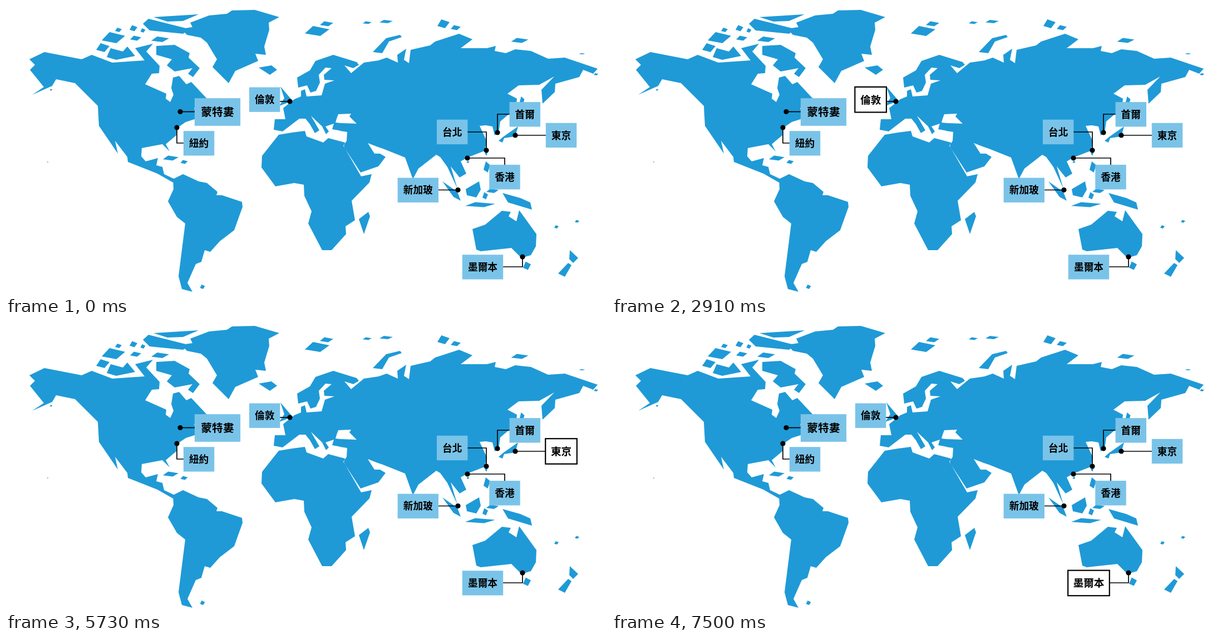
These frames come from a looping animation (1078x519 px, 8000 ms). An HTML page with a canvas:

```html
<!DOCTYPE html>
<html lang="zh-Hant">
<head>
<meta charset="utf-8">
<style>
html, body { margin: 0; width: 100%; height: 100%; overflow: hidden; background: #fff; }
canvas { display: block; }
</style>
</head>
<body>
<canvas id="stage" width="1078" height="519"></canvas>
<script>
const W = 1078, H = 519;
const LOOP = 8000, STEP = 1145;
const ctx = document.getElementById('stage').getContext('2d');

const toPath = pts => new Path2D('M' + pts.replace(/ /g, 'L'));
const land = new Path2D();
const coast = pts => land.addPath(toPath(pts + 'Z'));

// Small island: a skewed four-sided chip filling the given box.
function isle(x, y, w, h) {
  land.moveTo(x - w / 2, y + h / 4);
  land.lineTo(x - w / 6, y - h / 2);
  land.lineTo(x + w / 2, y - h / 6);
  land.lineTo(x + w / 8, y + h / 2);
  land.closePath();
}

function americas() {
  coast('42,96 69,83 136,96 154,88 191,102 249,98 232,76 264,68 252,82 276,108 275,121 262,122 250,141 288,158 287,167 295,173 301,160 297,148 300,129 311,126 324,141 333,137 361,167 338,184 345,202 323,209 307,220 306,233 287,249 294,262 281,249 244,256 243,271 251,280 273,274 270,287 281,290 284,303 303,312 300,318 272,302 219,281 218,272 196,243 201,266 167,216 165,180 124,139 90,132 83,144 47,160 68,146 43,115 52,106');
  coast('300,312 318,303 346,316 361,319 380,335 378,341 388,341 424,353 425,362 410,404 384,424 367,443 357,440 351,461 341,465 326,499 335,515 316,510 310,487 322,392 307,380 291,352 301,330');
  isle(296, 274, 28, 9);
  isle(320, 281, 13, 7);
  isle(353, 506, 9, 8);
  isle(81, 151, 5, 3);
  isle(75, 281, 2, 2);
}

function arctic() {
  coast('315,41 335,38 331,30 365,17 397,14 406,8 447,7 491,20 472,30 473,43 464,73 467,88 448,86 453,99 412,117 400,139 371,110 379,96 361,66 350,57 325,52');
  coast('454,111 477,107 487,115 474,124');
  coast('270,72 303,70 330,85 328,93 348,112 336,128 327,122 335,112 303,118 289,107 298,96 270,88');
  coast('181,92 188,76 210,82 218,73 232,90 198,97');
  coast('265,20 346,15 318,27 290,28');
  coast('246,32 256,23 331,42 318,50 258,44');
  isle(174, 75, 24, 16);
  isle(193, 57, 42, 20);
  isle(202, 43, 12, 8);
  isle(229, 40, 14, 11);
  isle(233, 58, 20, 9);
  isle(277, 60, 32, 10);
  isle(246, 44, 9, 8);
}

function africa() {
  coast('490,232 460,270 459,291 484,325 518,319 535,322 536,342 549,370 543,392 568,440 585,440 611,411 610,397 627,386 621,351 653,318 657,303 638,307 607,253 609,246 579,238 570,246 540,235 537,225 514,228');
  coast('634,384 651,371 654,379 643,411');
}

function europe() {
  coast('523,129 546,116 556,99 588,88 630,101 634,106 624,112 608,107 620,121 643,102 670,98 670,200 628,211 613,227 586,222 589,212 574,217 580,226 575,231 568,217 548,198 563,224 555,229 546,213 538,203 527,203 497,226 481,223 483,204 502,204 498,184 518,168 530,163 530,153 537,150 540,163 567,161 573,140 590,134 572,133 571,124 585,112 574,111 562,124 564,138 557,153 547,156 541,143 525,147');
  coast('493,145 515,171 491,180 500,166');
  isle(559, 45, 44, 18);
  isle(576, 32, 24, 9);
}

function asia() {
  coast('655,103 684,93 704,102 703,88 719,77 715,97 724,103 727,79 762,71 771,64 814,50 838,60 817,76 864,76 880,72 878,81 898,85 915,78 943,81 974,95 1004,93 1063,113 1055,122 1037,115 1030,128 987,140 986,155 964,176 962,151 985,127 958,142 921,143 901,158 918,167 915,195 655,195');
  coast('640,185 915,185 888,208 885,229 878,233 874,217 862,215 851,216 864,244 860,261 829,273 817,280 827,302 815,309 799,289 811,329 793,290 780,272 773,268 741,293 731,312 717,273 677,257 668,254 650,247 662,266 672,266 682,272 669,289 637,300 606,252 612,243 613,227 600,225');
  coast('659,83 683,58 708,52 711,56 688,64 676,85');
  coast('885,243 893,236 920,217 915,235 895,238 892,246');
  isle(649, 30, 16, 5);
  isle(683, 28, 24, 6);
  isle(786, 32, 22, 16);
  isle(808, 39, 18, 9);
  isle(923, 62, 31, 9);
  isle(1035, 86, 11, 2);
  isle(1060, 123, 8, 4);
  isle(927, 171, 9, 16);
  isle(863, 264, 5, 11);
  isle(830, 281, 5, 4);
}

function oceania() {
  coast('784,316 811,335 817,351 804,344');
  coast('826,330 850,316 853,331 845,345 828,341');
  coast('892,337 924,346 942,354 945,367 902,354');
  coast('838,402 861,394 891,369 907,371 903,379 917,388 922,368 953,411 952,433 943,449 926,454 908,436 853,442 845,439');
  coast('1013,440 1028,454 1019,463 1012,456');
  coast('1010,463 1016,467 1004,488 992,482');
  isle(852, 358, 54, 9);
  isle(861, 342, 10, 13);
  isle(864, 290, 12, 20);
  isle(874, 333, 22, 8);
  isle(936, 468, 14, 15);
  isle(989, 398, 8, 6);
  isle(1026, 388, 8, 5);
}

[americas, arctic, africa, europe, asia, oceania].forEach(build => build());
const blackSea = toPath('594,203 597,195 620,194 617,199 630,212 602,211 592,210');

// Connectors run from the dot to the label.
const cities = [
  { name: '蒙特婁', x: 380, y: 191, zoom: 1.12, line: '313,190.5 340,190.5' },
  { name: '紐約', x: 346.6, y: 247.4, line: '307,219 307,247 320,247' },
  { name: '倫敦', x: 464.7, y: 168.7, line: '510,172 491,172' },
  { name: '首爾', x: 932.3, y: 195.3, line: '883,228 883,195 906,195' },
  { name: '東京', x: 997.5, y: 233, line: '915,233 971,233' },
  { name: '台北', x: 801.7, y: 227, line: '863,260 863,227 828,227' },
  { name: '墨爾本', x: 856.5, y: 470.4, line: '928,452 928,470 892,470' },
  { name: '香港', x: 896, y: 308.3, line: '829,274 896,274 896,288' },
  { name: '新加玻', x: 740.3, y: 331.8, line: '812,331.5 775,331.5' }
];
for (const c of cities) {
  c.path = toPath(c.line);
  c.dot = c.line.split(' ')[0].split(',').map(Number);
}

const ease = (t, from, to) => {
  const k = Math.min(1, Math.max(0, (t - from) / (to - from)));
  return (1 - Math.cos(Math.PI * k)) / 2;
};
const mix = (a, b, k) => a + (b - a) * k;

// 0 = resting label, 1 = highlighted label; cities take turns in list order.
function highlight(turn, t) {
  const local = t - turn * STEP;
  return ease(local, 170, 630) * (1 - ease(local, STEP, STEP + 450));
}

function drawLabel({ name, x, y, zoom = 1 }, k) {
  const w = (name.length === 3 ? 73.4 : 55.4) * zoom + 1.2 * k;
  const h = 44.4 * zoom + 1.2 * k;
  ctx.save();
  ctx.translate(x, y);
  ctx.fillStyle = `rgb(${mix(122, 255, k)}, ${mix(195, 255, k)}, ${mix(232, 255, k)})`;
  ctx.fillRect(-w / 2, -h / 2, w, h);
  if (k > 0) {
    ctx.strokeStyle = `rgba(0, 0, 0, ${k})`;
    ctx.lineWidth = 2.2;
    ctx.strokeRect(-w / 2, -h / 2, w, h);
  }
  const size = zoom * mix(1, 1.05, k);
  ctx.scale(size, size);
  ctx.fillStyle = '#000';
  ctx.fillText(name, 0, 6.6);
  ctx.restore();
}

function draw(t) {
  ctx.fillStyle = '#fff';
  ctx.fillRect(0, 0, W, H);
  ctx.fillStyle = '#1f9ad7';
  ctx.fill(land);
  ctx.fillStyle = '#fff';
  ctx.fill(blackSea);

  ctx.font = 'bold 17.7px "Noto Sans CJK TC", "Noto Sans CJK", "Noto Sans CJK JP", sans-serif';
  ctx.textAlign = 'center';
  cities.forEach((c, i) => {
    ctx.strokeStyle = '#000';
    ctx.lineWidth = 1.7;
    ctx.stroke(c.path);
    drawLabel(c, highlight(i, t));
  });
  ctx.fillStyle = '#000';
  for (const { dot: [x, y] } of cities) {
    ctx.beginPath();
    ctx.arc(x, y, 4.6, 0, Math.PI * 2);
    ctx.fill();
  }
}

const start = performance.now();
function tick() {
  draw((performance.now() - start) % LOOP);
  requestAnimationFrame(tick);
}
tick();
</script>
</body>
</html>
```
